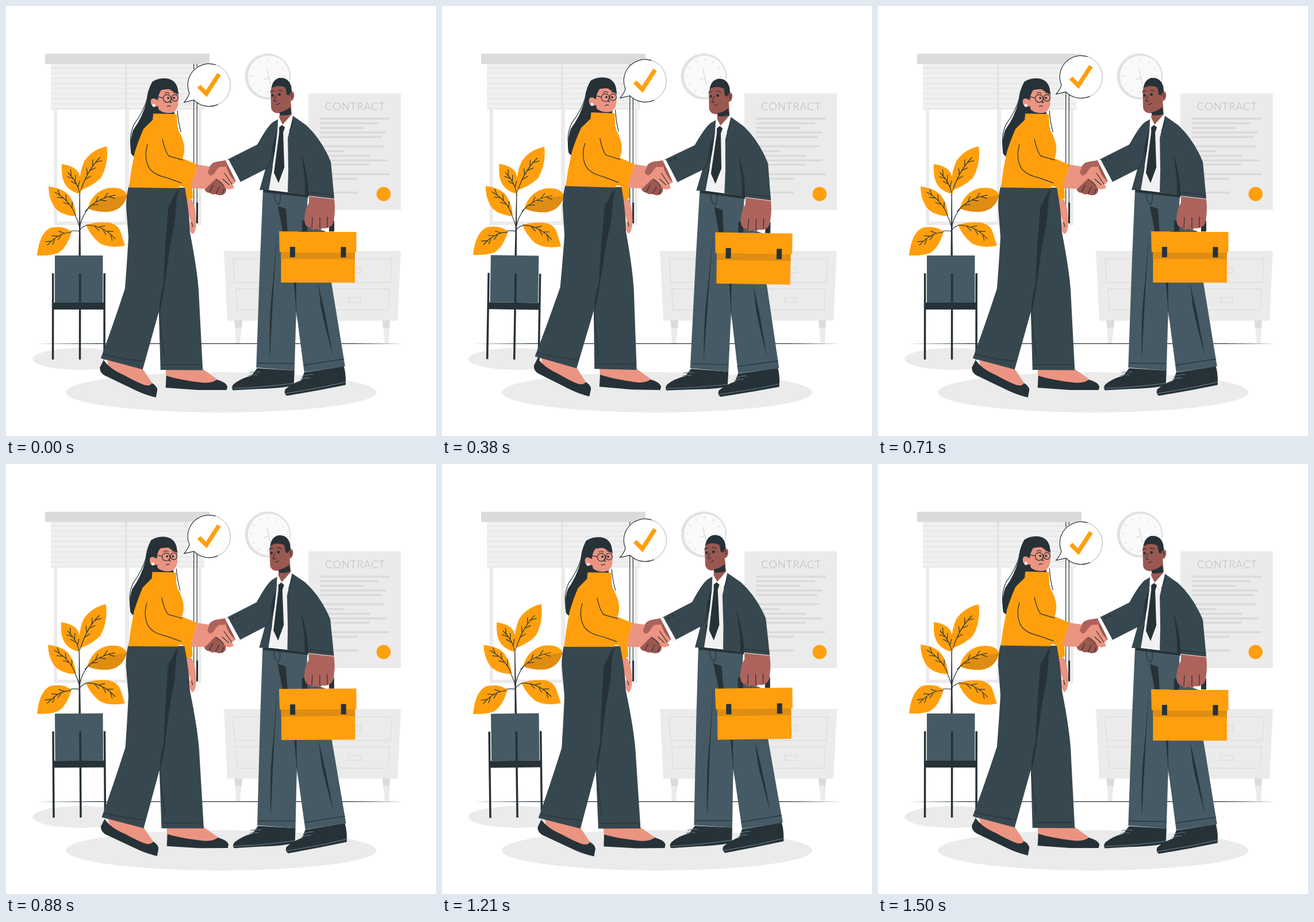
An HTML page for the animation above (1.54 s loop, 748x748 px).

```html
<!DOCTYPE html>
<html lang="en">
<head>
<meta charset="utf-8">
<title>Handshake</title>
<style>
html, body { margin: 0; height: 100%; overflow: hidden; background: #fff; }
svg { display: block; width: 100vw; height: 100vh; }
.ink { fill: #263238; } .slate { fill: #37474f; } .blue { fill: #455a64; }
.gold { fill: #ff9f0e; } .amber { fill: #df8d12; }
.rose { fill: #eb9481; } .brown { fill: #ad635c; } .umber { fill: #9b5850; }
.pale { fill: #ebebeb; } .grey { fill: #dbdbdb; } .white { fill: #fff; }
.line { fill: none; stroke: #263238; stroke-width: 1.2; stroke-linecap: round; stroke-linejoin: round; }
.faint { fill: none; stroke: #dedede; stroke-width: 1.5; }
</style>
</head>
<body>
<svg viewBox="0 0 748 748">
  <ellipse class="pale" cx="130" cy="614" rx="84" ry="19"/>
  <ellipse class="pale" cx="374" cy="672" rx="270" ry="35"/>

  <g id="window">
    <path class="pale" fill-rule="evenodd" d="M83 180H340V381H83ZM89 180V375H207V180ZM214 180V375H334V180Z"/>
    <path fill="#f0f0f0" d="M78 101H340V164H345V180H78Z"/>
    <path id="slats" fill="none" stroke="#e4e4e4" stroke-width="1.4"/>
    <path fill="none" stroke="#e4e4e4" stroke-width="4" d="M209 101V180"/>
    <path class="grey" d="M68 83H354V101H68Z"/>
    <path class="line" d="M326.7 101V377M332.3 101V377"/>
    <path class="ink" d="M331 342H334V378H331Z"/>
  </g>

  <g id="clock">
    <circle cx="455.5" cy="122.5" r="40" fill="#e2e2e2"/>
    <circle cx="457" cy="122.5" r="36" fill="#fafafa"/>
    <circle cx="456" cy="122.5" r="29" fill="none" stroke="#d4d4d4" stroke-width="4.5" stroke-dasharray="1 14.18"/>
    <path class="faint" stroke-width="1" d="M454 110L460 137M459 124L449 128"/>
  </g>

  <path class="pale" d="M526 152H687V355H526Z"/>
  <text x="607.5" y="181" text-anchor="middle" font-family="Lato, sans-serif" font-weight="300" font-size="18.5" letter-spacing=".9" fill="#b5b5b5">CONTRACT</text>
  <path id="writing" fill="none" stroke="#dadada" stroke-width="3.6"/>
  <circle class="gold" cx="656.8" cy="327" r="12.3"/>

  <g id="cabinet">
    <path class="pale" d="M379 426H687L681 547.500H385ZM398 547H411L407 587H400ZM655 547H668L666 587H659Z"/>
    <path class="grey" d="M397 547H411L410 560H399ZM655 547H668L667 560H656Z"/>
    <path class="faint" d="M395 440H671L669 481H398ZM400 492H667L665 529H402ZM596 455H617V464H596ZM596 507H617V515.500H596Z"/>
  </g>
  <path class="ink" d="M54 587.500L160 586.800H600L694 587.500L600 588H160Z"/>

  <g id="plant">
    <path class="ink" d="M126.500 435L127.500 325H128.700L130 435Z"/>
    <path class="line" d="M128 388Q130 368 143 352M128 386Q126 374 117 358M128 392Q122 390 110 392M129 389Q133 383 142 381M128 330Q128 325 131 318"/>
    <path class="blue" d="M85 434H168.500V516H85Z"/>
    <path class="ink" d="M80 465H83.500V516H127V465H130.700V516H169.500V465H173V615H169.500V528H130.500V615H127V528H83.500V615H80Z"/>
  </g>

  <g id="people">
    <!-- woman -->
    <path class="ink" d="M254 132Q264 125 279 126Q294 128 298 142L300 153L292 186L299 215L252 205L232 262Q222 265 217.500 257Q214 236 221 216Q237 194 244 168Q245 148 254 132Z"/>
    <path class="line" stroke-width="1" d="M246 160Q238 186 223 205Q212 228 219 252M298 182Q299 200 304 219"/>
    <path class="rose" d="M263 160L269 146Q284 142 296 150Q300 152 299 158Q302 178 291 185Q277 190 266 182L264 174Q254 178 252 170Q250 160 258 161Z"/>
    <path class="ink" d="M264 164Q264 154 270 146L284 144Q290 150 299 153L298 143Q290 128 270 129Q258 136 258 161ZM265 180Q276 189 293 185L292 191H268Z"/>
    <circle class="white" cx="257" cy="173" r="2.600"/>
    <path class="line" d="M264 158L273 160M287 160H288M276 152Q280 149 284 152M291 151Q295 150 297 153M287 163L285 168L288 168M280 175Q283 173 286 174"/>
    <circle class="line" cx="280" cy="161" r="6.800"/><circle class="line" cx="293.500" cy="160" r="5.800"/>
    <circle class="ink" cx="282" cy="160" r="1.900"/><circle class="ink" cx="292" cy="160" r="1.900"/>

    <path class="rose" d="M314 334L324 338Q331 352 331 375Q331 390 326 396Q321 398 320 386L321 373L316 360Z"/>
    <path class="line" d="M323 377L325 384"/>
    <path class="gold" d="M310 312H324L325 334Q318 340 313 337Z"/>

    <path class="rose" d="M176 612L237 630L257 660L238 668L180 640ZM278 632H343L371 652L345 664L279 650Z"/>
    <path class="ink" d="M170 616Q181 632 205 642Q230 656 243 660Q252 661 254 656Q263 661 263.500 668L261 681Q242 677 222 667L172 643Q163 638 163.500 629ZM279 643Q300 650 340 655Q358 657 367 650Q383 654 385.500 662L384 668H335L278 664Z"/>
    <path class="slate" d="M213 315L311 316Q319 358 320 394Q335 470 336 510L342.500 633.500L269 633L266 532L238 632.500L165 613Q184 562 207 492Q210 455 213 402L209 350Q209 330 213 315Z"/>
    <path class="ink" d="M298 319L295 358Q294 380 286 413L274 500L267 536Q266 512 274 484L277 420L282 352Z"/>
    <path class="line" d="M297 327Q294 340 281 348M300 319Q297 338 287 344M169 606Q205 615 240 618M272 624H340M267 537L275 610"/>

    <path class="gold" d="M256 187L297 188L298 213Q311 235 310 250Q310 258 307 265L333 276L321 318L302 313L301 317L213.500 316Q217 285 224 254Q231 232 239 214L255 198Z"/>
    <path class="line" d="M246 241Q239 264 249 282Q257 294 280 299L305 308M272 232Q276 252 283 261L307 268"/>

    <!-- man -->
    <path class="blue" d="M447 319L525 328L522 380L556 392L566 480L590 626.500L519 636.500L505 530L502 634L435.500 629L442 440Z"/>
    <path class="ink" d="M448 319L526 329V333L448 324ZM473 348L487 353L490 395H482L475 360ZM501 481L506 545L505 510L505 481ZM472 390L466 480L459 614Q457 545 464 485ZM543 482L555 535L569 608Q556 562 548 524Z"/>
    <path class="line" d="M467 324Q465 338 474 345Q478 342 477 327M438 621L501 622M518 624.500L588 614"/>
    <path class="ink" d="M437 630L502 634L501 660Q480 665 440 666L395 668.500Q391 664 396 658Q408 648 427 643ZM519 637L588 626.500Q592 640 591 659L545 668L489 678Q483 674 486 667Q497 657 514 651Z"/>
    <path fill="none" stroke="#607580" stroke-width="1.200" d="M394 665Q440 664 501 656M486 674L545 664L591 654M424 638Q434 635 442 637M422 643Q430 640 438 642M515 645Q525 640 534 641M512 650Q521 646 529 647"/>

    <path class="white" d="M474 190L496 187L505 210L493 322L456 320L468 250Z"/>
    <path fill="#f1f1f1" d="M475 195L494 192L496 225L491 321L457 319L468 250Z"/>
    <path class="umber" d="M460 148Q467 131 484 132L494 148Q502 148 501 156Q500 165 495 165L497 190L481 206L475 194L476 186Q464 188 461 178Z"/>
    <path class="ink" d="M461 149Q461 129 475 125Q491 123 496 140L497 150Q493 150 492 156L488 154L486 142Q474 136 463 142ZM475 185Q486 183 494 176L496 188Q488 191 477 190Z"/>
    <circle class="ink" cx="463.500" cy="155.500" r="2.300"/><circle class="ink" cx="475.500" cy="154" r="2.500"/>
    <path class="line" stroke-width="2" d="M460 149L466 147M473 147Q478 145 481 149M469 156L466 165Q468 167 471 165M470 171Q473 172 476 169M494 153Q498 152 497 159"/>
    <path class="white" d="M474 194L480 207L474 215L471 201ZM497 188L501 198L490 217L481 207Z"/>
    <path class="ink" d="M475 211L480 207L485 211L482 220L484 281L474 308L466 290L475 220Z"/>
    <path class="slate" d="M473 197L472 216L463 284L457 320.500L441 320L451 284L404 308L385 267L437 241Q454 210 464 202ZM499 191L522 207Q549 232 565 271L571 335L527 330L490 324L491 284L490 230Z"/>
    <path class="ink" d="M514 258Q524 285 527 330L520 328V303ZM472 216L464 240L463 285L457 306L468 250Z"/>
    <path class="line" d="M463 244Q463 266 456 280L451 284M528 324L570 329M500 200L493 217"/>
    <circle class="ink" cx="395.500" cy="268" r="1.900"/><circle class="ink" cx="403.500" cy="264.500" r="1.900"/>

    <path class="ink" d="M515 373H571V392H562V382H524V392H515Z"/>
    <path class="brown" d="M527 331L571 336Q573 355 571 366Q570 382 563 384Q558 388 551 386Q545 392 540 387Q532 391 529 385Q520 385 519 371Q520 352 527 342Z"/>
    <path class="line" d="M532 386L533 368M546 387V368M559 384V367"/>
    <path class="gold" d="M478.500 427H607V481H478.500Z"/>
    <path class="amber" d="M478.500 428H607V440H478.500Z"/>
    <path class="gold" d="M475 392H609.500V428H476Z"/>
    <path class="ink" d="M494 419H503V437H494ZM582.500 419H591.500V437H582.500Z"/>

    <!-- clasped hands -->
    <path class="umber" d="M351 291Q352 274 366 271L384 269L400 306L374 304ZM359 301Q346 307 345 316Q346 325 354 325Q358 329 365 327Q371 331 377 328Q384 326 383 317L376 303Z"/>
    <path class="rose" d="M333 276L353 279L365 283Q373 274 383 279Q387 294 398 305Q398 310 393 310Q400 317 392 318Q385 321 379 313Q368 301 364 301L347 318L321 317Z"/>
    <path class="brown" d="M353 284Q357 272 372 270L384 268L389 279L371 280Q366 284 363 290Q355 300 351 289Z"/>
    <path class="line" d="M365 301Q372 304 379 313M377 301L388 311M380 291L393 310M354 324L360 312M365 327L371 315M376 328L379 319"/>
    <path class="white" d="M382 269L387 267L408 306L402 309Z"/>
  </g>

  <g id="bubble">
    <path class="white" d="M317 148A37 37 0 1 1 327 164L309.500 168Q317 160 319 152Z"/>
    <path fill="none" stroke="#263238" stroke-width=".4" d="M353 101A37 37 0 1 1 327 164"/>
    <path class="line" stroke-width="1.300" d="M364 102.500A37 37 0 0 0 319 152Q317 160 309.500 168L327 164A37 37 0 0 0 368 172"/>
    <path fill="none" stroke="#ff9f0e" stroke-width="7.500" d="M335.500 140L348.500 153L370.500 119"/>
  </g>
</svg>
<script>
const $ = id => document.getElementById(id);

$('slats').setAttribute('d', Array.from({ length: 9 }, (_, i) => `M78 ${108 + i * 8.9}h${i > 6 ? 267 : 262}`).join(''));

const rows = [[196, 121], [204, 103], [212, 78], [220, 116], [228, 107], [244, 111], [252.5, 42],
  [260.5, 87], [268.5, 116], [276, 86], [292.5, 121], [300.5, 66], [324.5, 66]];
$('writing').setAttribute('d', rows.map(([y, w]) => `M546 ${y}h${w}`).join(''));

function addPath(parent, cls, d) {
  const path = document.createElementNS('http://www.w3.org/2000/svg', 'path');
  path.setAttribute('class', cls);
  path.setAttribute('d', d);
  parent.append(path);
}

// A leaf outline with a curved midrib and short side veins.
function leaf(outline, x0, y0, cx, cy, x1, y1, shade) {
  addPath($('plant'), 'gold', outline);
  if (shade) addPath($('plant'), 'amber', shade);
  let veins = `M${x0} ${y0}Q${cx} ${cy} ${x1} ${y1}`;
  for (let i = 1; i < 6; i++) {
    const t = .12 + i * .14, s = 1 - t;
    const x = s * s * x0 + 2 * s * t * cx + t * t * x1;
    const y = s * s * y0 + 2 * s * t * cy + t * t * y1;
    const dir = Math.atan2(s * (cy - y0) + t * (y1 - cy), s * (cx - x0) + t * (x1 - cx));
    const turn = dir + (i % 2 ? .6 : -.6);
    veins += `M${x} ${y}l${11 * Math.cos(turn)} ${11 * Math.sin(turn)}`;
  }
  addPath($('plant'), 'line', veins);
}
leaf('M131 320Q124 297 136 270Q149 250 175 244Q179 274 165 299Q152 312 131 320Z', 131, 318, 142, 285, 163, 264);
leaf('M129 327Q103 321 98 298Q96 287 97 275Q119 278 126 290Q133 305 129 327Z', 128, 325, 124, 306, 108, 290);
leaf('M122 366Q90 363 82 346Q74 333 74 314Q105 318 113 335Q121 348 122 366Z', 121, 364, 111, 338, 85, 324);
leaf('M142 352Q150 324 176 317Q204 313 211 329Q203 356 178 358Q158 359 142 352Z', 138, 357, 158, 334, 190, 329,
  'M142 352Q163 334 211 329Q203 356 178 358Q158 359 142 352Z');
leaf('M114 393Q106 421 90 430Q76 435 54 434Q58 395 77 386Q101 381 114 393Z', 113, 394, 92, 394, 72, 416);
leaf('M139 381Q158 374 181 377Q196 381 200 395L207 417Q178 422 162 412Q147 399 139 381Z', 140, 381, 168, 381, 190, 405);

const LOOP = 1540, STEPS = 36, STEP = 125 / 3;

function draw(now) {
  const step = Math.floor((now % LOOP + 4) / STEP);
  const u = (step + .5) / STEPS % 1;
  const sway = u < .25 ? 4 * u : u < .75 ? 2 - 4 * u : 4 * u - 4; // degrees
  const lift = 15 * (1 - Math.abs(2 * u - 1));
  $('people').setAttribute('transform', `rotate(${sway} 377 403)`);
  $('plant').setAttribute('transform', `rotate(${sway} 131 430)`);
  $('bubble').setAttribute('transform', `translate(0 ${-lift})`);
  requestAnimationFrame(draw);
}
requestAnimationFrame(draw);
</script>
</body>
</html>
```
